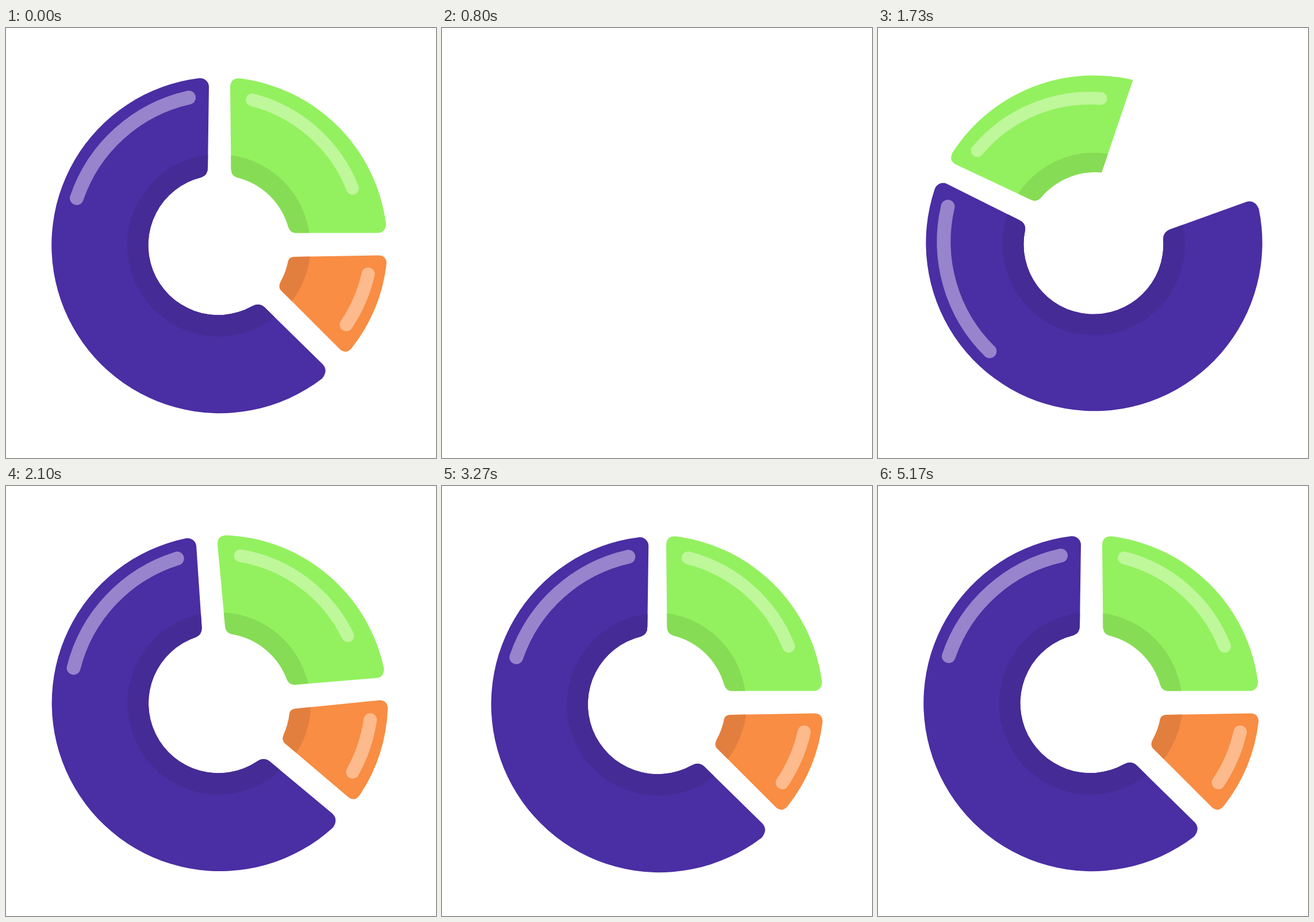
These frames come from a looping animation (748x748 px, 5.21 s). An HTML page with a canvas:

```html
<!DOCTYPE html>
<html>
<head>
<meta charset="utf-8">
<style>
html, body { margin: 0; width: 100%; height: 100%; overflow: hidden; background: #fff; }
canvas { display: block; }
</style>
</head>
<body>
<canvas id="stage" width="748" height="748"></canvas>
<script>
const ctx = document.getElementById('stage').getContext('2d');
const LOOP = 5210;
const RAD = Math.PI / 180;
const PIVOT = [370.8, 372.4];
const WIPE = [340, 354.5];
const NUDGE = 334;

// nudge: [start time, dx, dy]
const slices = [
  {
    fill: '#4a2ea3', dark: '#452b95', light: '#9684cc', width: 24,
    shape: 'M336 87.2C345 86.5 353 93 353 102L351 243Q351 256 340 259.8' +
      'A121.5 121.5 0 1 0 428 484Q440 477 450 486L551 585Q561 596 550 609.7A292.6 292.6 0 1 1 336 87.2Z',
    shine: 'M123 296A268 268 0 0 1 318 121',
    band: [369.5, 378, 158.5], nudge: [3033, 8, 2.5]
  },
  {
    fill: '#93f15f', dark: '#87dc55', light: '#bff79b', width: 22,
    shape: 'M406 87.6A293 293 0 0 1 661 341Q660 356 647 356.5L504 356.5Q494 356 491 346' +
      'A123 123 0 0 0 402 260Q392 257 391.5 246L390 102Q391 87 406 87.6Z',
    shine: 'M428 125A256 256 0 0 1 603 279',
    band: [370.5, 378.5, 158.5], nudge: [2766, -8, 7]
  },
  {
    fill: '#f88d43', dark: '#e27f3f', light: '#fcba8d', width: 23,
    shape: 'M503 398L648 395.5Q662 396 662 410A293 293 0 0 1 602 556Q593 568 582 560' +
      'L478 456Q473 450 478 441A124 124 0 0 0 491 405Q493 398 503 398Z',
    shine: 'M630 428A262 262 0 0 1 592 516',
    band: [370, 378, 160], nudge: [2500, -9, -4]
  }
];
for (const s of slices) {
  s.shape = new Path2D(s.shape);
  s.shine = new Path2D(s.shine);
}

// Rotation in degrees and visible share of the ring
function pose(t) {
  if (t < 70 || t >= 2130) return [0, 1];
  if (t < 800) {
    const u = t / 800;
    return [-0.18 * t, 1 - 0.675 * u - 0.325 * u ** 8];
  }
  if (t < 1085) return [0, 0];
  const v = Math.min(1, (2130 - t) / 1060);
  return [-0.161 * (2130 - t), 1 - 0.725 * v ** 1.67 - 0.275 * v ** 16];
}

function drawSlice(s, t) {
  const [start, dx, dy] = s.nudge;
  const u = (t - start) / NUDGE;
  const k = u > 0 && u < 1 ? Math.sin(Math.PI * u) : 0;
  ctx.save();
  ctx.translate(dx * k, dy * k);
  ctx.fillStyle = s.fill;
  ctx.fill(s.shape);
  ctx.clip(s.shape);
  ctx.fillStyle = s.dark;
  ctx.beginPath();
  ctx.arc(...s.band, 0, 2 * Math.PI);
  ctx.fill();
  ctx.strokeStyle = s.light;
  ctx.lineWidth = s.width;
  ctx.lineCap = 'round';
  ctx.stroke(s.shine);
  ctx.restore();
}

function draw(t) {
  const [turn, share] = pose(t);
  ctx.fillStyle = '#fff';
  ctx.fillRect(0, 0, 748, 748);
  if (share <= 0) return;
  ctx.save();
  ctx.translate(...PIVOT);
  ctx.rotate(turn * RAD);
  ctx.translate(-PIVOT[0], -PIVOT[1]);
  if (share < 1) {
    ctx.beginPath();
    ctx.moveTo(...WIPE);
    ctx.arc(...WIPE, 700, 44 * RAD, (44 + 360 * share) * RAD);
    ctx.closePath();
    ctx.clip();
  }
  for (const s of slices) drawSlice(s, t);
  ctx.restore();
}

const begin = performance.now();
function tick() {
  draw((performance.now() - begin) % LOOP);
  requestAnimationFrame(tick);
}
tick();
</script>
</body>
</html>
```
